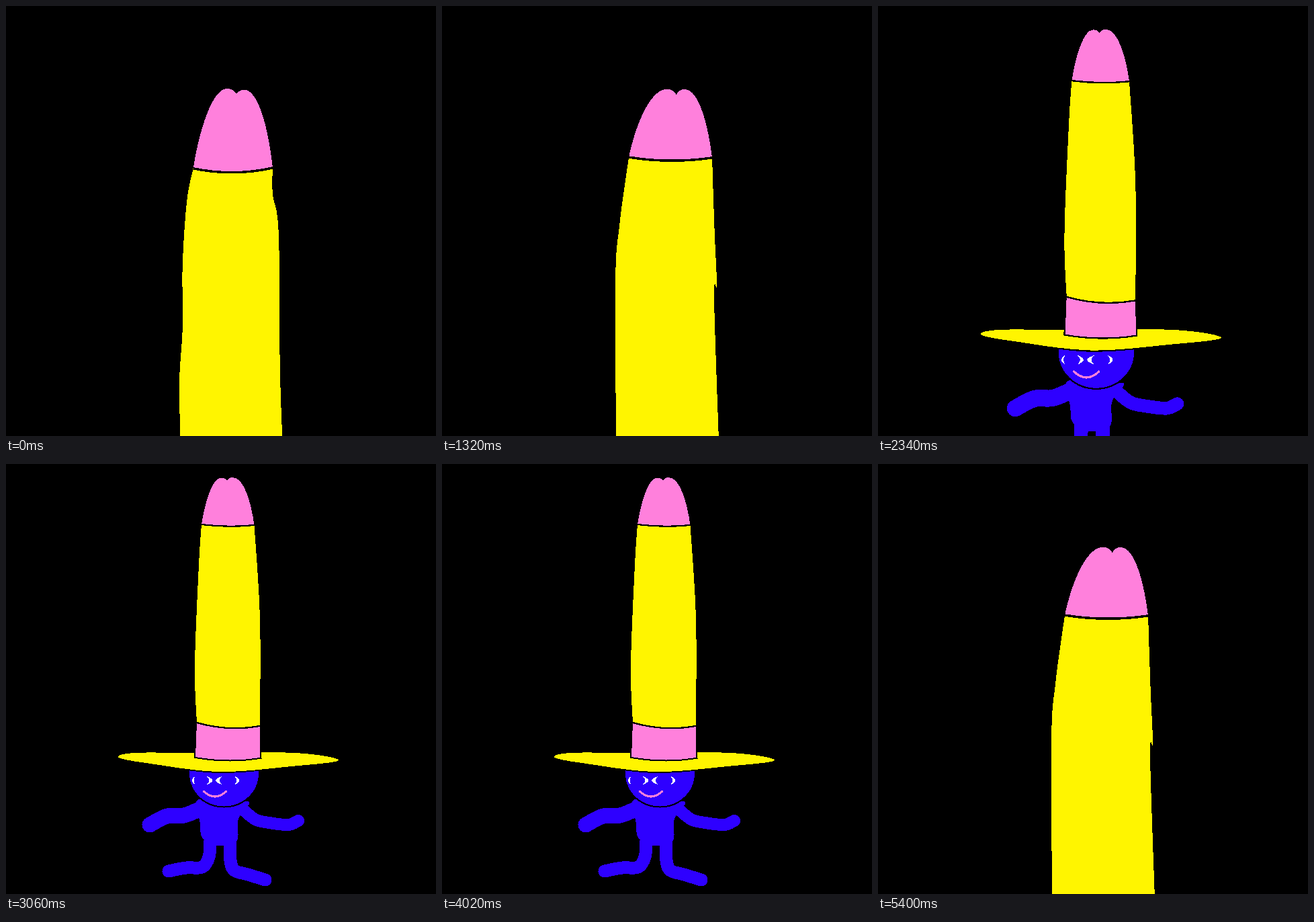
Write an HTML page that moves like this. It is 640 px wide and 640 px high and loops after 5430 ms.

```html
<!DOCTYPE html>
<html lang="en">
<head>
<meta charset="utf-8">
<title>Tall hat</title>
<style>
  html, body { margin: 0; width: 100%; height: 100%; overflow: hidden; background: #000; }
  svg { display: block; width: 100%; height: 100%; shape-rendering: crispEdges; }
  .blue { fill: #2e00ff; }
  .yellow { fill: #fff500; }
  .pink { fill: #ff80dc; }
  .white { fill: #fff; }
  .edge { stroke: #000; stroke-width: 4; paint-order: stroke; }
  .line, .smile, .limb { fill: none; stroke-linecap: round; }
  .line { stroke: #000; stroke-width: 2.2; stroke-linecap: butt; }
  .smile { stroke: #ff80dc; stroke-width: 3; }
  .limb { stroke: #2e00ff; }
</style>
</head>
<body>
<svg viewBox="0 0 640 640"><g id="scene"></g></svg>
<script>
const LOOP = 5430, TICK = 30, BOIL = 60, ZOOM = 0.59;
const scene = document.getElementById('scene');

const TORSO = '285,500 325,506 362,503 346,528 343,562 313,568 292,556 289,535';
const BASE = [[282, 436], [378.5, 437]];

// Limbs are a width and the points of the centre line; eyes are an x and a reach
const stance = {
  raised: {
    limbs: {
      leftArm: [25, '290,512 268,520 240,516 215,520'],
      rightArm: [20, '355,512 377,527 395,521 416,508'],
      leftLeg: [18, '303,560 303,585 275,585 247,577'],
      rightLeg: [20, '332,560 331,595 355,612 386,623']
    },
    brim: '169,435 210,429 330,424 470,430 498,438 440,449 334,456 230,446',
    eyeY: 468, eyes: [[283, -6], [298, 9], [319, -8], [335, 10]]
  },
  lowered: {
    limbs: {
      leftArm: [23, '290,513 265,523 240,524 214,537'],
      rightArm: [18, '350,512 371,529 392,534 420,537 435,531'],
      leftLeg: [19, '304,560 302,585 292,600 268,601 242,606'],
      rightLeg: [19, '333,560 334,590 340,605 360,611 386,619']
    },
    brim: '168,437 190,430 281,430 430,430 495,441 425,450 317,458 215,446',
    eyeY: 471, eyes: [[282, -5], [298.5, 8.5], [322.5, -10.5], [340, 7]]
  }
};

// crown: left bump, notch, right bump; bow: depth of the line under the tip
const drawings = [
  { pose: 'raised', seed: 1, bow: 8, crown: '325.7,24.3 334.5,29.3 341.5,25.3',
    left: '294,99 288,130 284,190 284,249 281,302 283,384',
    right: '368.4,98.5 368.4,123 374,160 375.3,290 379,386' },
  { pose: 'raised', seed: 0, bow: 13, crown: '325.5,25.3 332.8,29.9 341,26',
    left: '291.6,98.5 285.2,157 279.7,262 282.5,383',
    right: '374,98.5 375,217 378.6,331 378.6,384' },
  { pose: 'lowered', seed: 3, bow: 6, crown: '329.5,24.7 338,29.8 345.8,24.9',
    left: '293.6,88.5 285,151 281,208 282,384',
    right: '371.6,89 374,161 376,208 373.5,222 379,385' },
  { pose: 'lowered', seed: 0, bow: 4.5, crown: '320,20.5 329,25 337.5,20',
    left: '291,90 287,150 281,300 284,385',
    right: '369.5,91 378,230 378,390' }
];

const parse = text => text.split(' ').map(p => p.split(',').map(Number));
const path = (cls, d, extra = '') => `<path class="${cls}" d="${d}" ${extra}/>`;

// Points of a hand-drawn shape, nudged when a seed is given
const shaky = (text, seed) => parse(text).map(([x, y], i) => seed
  ? [x + 1.5 * Math.sin(i * 1.7 + seed), y + 1.5 * Math.cos(i * 1.3 + seed)]
  : [x, y]);

// Catmull-Rom curve through the points, without the leading move
function curve(pts, closed) {
  const n = pts.length;
  const at = i => closed ? pts[(i + n) % n] : pts[Math.max(0, Math.min(n - 1, i))];
  let d = '';
  for (let i = 0; i < (closed ? n : n - 1); i++) {
    const [a, b, c, e] = [at(i - 1), at(i), at(i + 1), at(i + 2)];
    d += `C${b[0] + (c[0] - a[0]) / 6},${b[1] + (c[1] - a[1]) / 6} ` +
         `${c[0] - (e[0] - b[0]) / 6},${c[1] - (e[1] - b[1]) / 6} ${c}`;
  }
  return d;
}
const blob = pts => `M${pts[0]}${curve(pts, true)}Z`;

const sag = (a, b, depth) => `Q${(a[0] + b[0]) / 2},${(a[1] + b[1]) / 2 + depth} ${b}`;

const crescent = (x, y, reach, h = 6.5) =>
  `M${x},${y - h}Q${x + 2 * reach},${y} ${x},${y + h}Q${x + 0.9 * reach},${y} ${x},${y - h}Z`;

function drawFigure({ limbs, brim, eyeY, eyes }, seed) {
  const arms = Object.values(limbs).map(([width, text]) => {
    const pts = shaky(text, seed);
    return path('limb', `M${pts[0]}${curve(pts)}`, `stroke-width="${width}"`);
  });
  return arms.join('') +
    path('blue', blob(shaky(TORSO, seed))) +
    '<ellipse class="blue edge" cx="324.5" cy="461" rx="51.5" ry="48.5"/>' +
    path('white', eyes.map(([x, reach]) => crescent(x, eyeY, reach)).join('')) +
    path('smile', `M294,${eyeY + 16}Q311,${eyeY + 32} 328,${eyeY + 16}`) +
    path('yellow edge', blob(shaky(brim, seed)));
}

function drawHat({ crown, left, right, bow }) {
  const [[bumpL, notch, bumpR], side, back] = [crown, left, right].map(parse);
  const up = back.slice().reverse();
  const [l0, l1, r0, r1] = [side[0], side[side.length - 1], back[0], up[0]];
  const shoulder = (p, q, k) => `${p[0] + k * (q[0] - p[0])},`;
  const low = p => p[1] + 0.46 * (notch[1] - 5 - p[1]);
  const tip = `M${l0}C${shoulder(l0, bumpL, 0.17)}${low(l0)} ${shoulder(l0, bumpL, 0.55)}${bumpL[1]} ${bumpL}` +
    `Q${notch[0] - 3},${bumpL[1]} ${notch}Q${notch[0] + 3},${bumpR[1]} ${bumpR}` +
    `C${shoulder(r0, bumpR, 0.47)}${bumpR[1]} ${shoulder(r0, bumpR, 0.14)}${low(r0)} ${r0}`;
  const tube = `M${l0}${curve(side)}${sag(l1, r1, 11)}${curve(up)}${sag(r0, l0, bow)}Z`;
  const band = `M${l1}L${BASE[0]}${sag(...BASE, 8)}L${r1}${sag(r1, l1, 11)}Z`;
  return path('pink edge', band) + path('yellow', tube) +
    path('pink', `${tip}${sag(r0, l0, bow)}Z`) +
    path('line', `M${l0}${sag(l0, r0, bow)}M${l1}${sag(l1, r1, 11)}`);
}

scene.innerHTML = drawings
  .map(d => `<g>${drawFigure(stance[d.pose], d.seed)}${drawHat(d)}</g>`)
  .join('');
const cels = [...scene.children];

// 1 = close up, 0 = whole figure
function closeness(t) {
  if (t < 2010) return 1;
  if (t < 2400) return (2400 - t) / 390;
  if (t < 4800) return 0;
  return Math.min(1, (t - 4800) / 570);
}

function render(ms) {
  const t = Math.floor((ms % LOOP) / TICK) * TICK;
  const grow = ZOOM * closeness(t);
  const current = Math.floor(t / BOIL) % cels.length;
  scene.setAttribute('transform', `translate(${-320 * grow} ${143 * grow}) scale(${1 + grow})`);
  cels.forEach((cel, i) => { cel.style.display = i === current ? '' : 'none'; });
}

const start = performance.now();
function tick() {
  render(performance.now() - start);
  requestAnimationFrame(tick);
}
tick();
</script>
</body>
</html>
```
